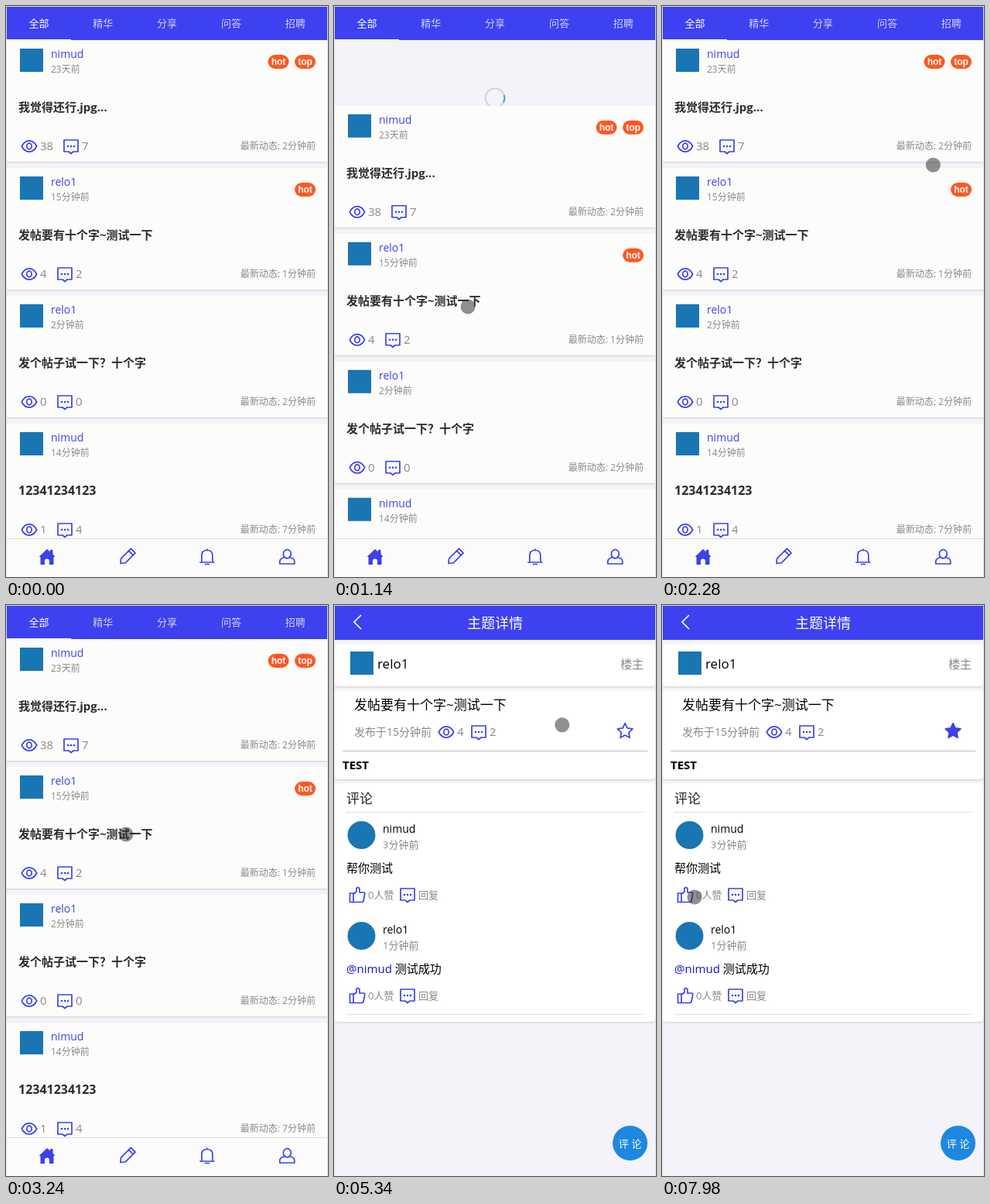
An HTML page that plays this animation: 416x737 px, repeating every 8 s.

```html
<!DOCTYPE html>
<html lang="zh">
<head>
<meta charset="utf-8">
<style>
html, body { margin: 0; width: 100%; height: 100%; overflow: hidden; background: #f4f3f9; }
svg { display: block; width: 416px; height: 737px; }
text { font-family: "Open Sans", "Noto Sans CJK SC", "Noto Sans CJK", sans-serif; white-space: pre; }
.line { fill: none; stroke: #3d41e8; stroke-width: 1.7; stroke-linejoin: round; stroke-linecap: round; }
.solid { fill: #3d41e8; }
.card { filter: drop-shadow(0 1px 1px rgba(0, 0, 0, .16)); }
</style>
</head>
<body>
<svg id="stage" viewBox="0 0 416 737"></svg>
<script>
const BLUE = '#3d41f0', INK = '#3d41e8', GREY = '#888', LOGO = '#1a75b3';
const USER_A = 'nimud', USER_B = 'relo1';

const text = (x, y, size, fill, str, extra = '') =>
  `<text x="${x}" y="${y}" font-size="${size}" fill="${fill}" ${extra}>${str}</text>`;
const rect = (x, y, w, h, fill, extra = '') =>
  `<rect x="${x}" y="${y}" width="${w}" height="${h}" fill="${fill}" ${extra}/>`;
const circle = (x, y, r, fill, extra = '') =>
  `<circle cx="${x}" cy="${y}" r="${r}" fill="${fill}" ${extra}/>`;
const path = (d, cls = 'line') => `<path class="${cls}" d="${d}"/>`;
const MID = 'text-anchor="middle"', END = 'text-anchor="end"', BOLD = 'font-weight="700"';

const STAR = Array.from({ length: 10 }, (_, i) => {
  const a = (i / 5 - 0.5) * Math.PI, r = i % 2 ? 5 : 10.3;
  return `${i ? 'L' : 'M'}${r * Math.cos(a)} ${r * Math.sin(a)}`;
}).join('') + 'Z';

const ICONS = {
  eye: path('M-9.7 0C-5-9.5 5-9.5 9.7 0C5 9.5-5 9.5-9.7 0Z') +
    '<ellipse class="line" rx="3.2" ry="3.8"/>',
  chat: path('M-9-8H9V7H3L0 9.5L-3 7H-9Z') + [-4, 0, 4].map(x => circle(x, 0, 1.3, INK)).join(''),
  thumb: path('M-9.5-2H-5V9.500H-9.5ZM-5-1L-1-4V-8.5Q1-10.5 3-8V-3H8.5Q10-3 9.7-1L8 8Q7.7 9.5 6 9.5H-5'),
  home: path('M-10.5 0L0-10L4-6.5V-9H7.5V-3.6L10.5 0H8.5V10H3V5Q3 2.500 0 2.500T-3 5V10H-8.5V0Z', 'solid'),
  pencil: '<g transform="rotate(45)">' + path('M-4-11H4V7L0 12L-4 7ZM-4-7H4') + '</g>',
  bell: path('M-9 7H9M-7 7V-2Q-7-8.5 0-8.5T7-2V7M0-8.5V-10M-2.5 9.5H2.5'),
  person: '<ellipse class="line" cy="-3.8" rx="4.9" ry="5.6"/>' +
    path('M-4 1Q-9.500 2-9.5 6V9H9.5V6Q9.5 2 4 1'),
};
const icon = (name, x, y) => `<g transform="translate(${x} ${y})">${ICONS[name]}</g>`;

const badge = (right, label) =>
  rect(right - 27, 19, 27, 18, '#ff5722', 'rx="9"') +
  text(right - 13.5, 32, 12, '#fff', label, `${MID} ${BOLD} style="font-family:'Liberation Sans',sans-serif"`);

function post(i, user, age, title, views, replies, active, badges = '', size = 15) {
  const cx = views > 9 ? 84 : 76;
  return `<g transform="translate(0 ${44 + i * 165})">` +
    rect(1, 0, 414, 157, '#fcfcfb', 'class="card"') +
    rect(18, 11, 30, 30, LOGO) +
    text(58, 23, 14, INK, user) + text(58, 42, 12, GREY, age) +
    text(16, 92, size, '#2c2c2c', title, BOLD) +
    icon('eye', 30, 137) + text(44, 142, 15, GREY, views) +
    icon('chat', cx, 137) + text(cx + 14, 142, 15, GREY, replies) +
    text(400, 141, 12, GREY, `最新动态: ${active}分钟前`, END) + badges + '</g>';
}

const posts =
  post(0, USER_A, '23天前', '我觉得还行.jpg...', 38, 7, 2, badge(365.5, 'hot') + badge(400, 'top')) +
  post(1, USER_B, '15分钟前', '发帖要有十个字~测试一下', 4, 2, 1, badge(400, 'hot')) +
  post(2, USER_B, '2分钟前', '发个帖子试一下？十个字', 0, 0, 2) +
  post(3, USER_A, '14分钟前', '12341234123', 1, 4, 7, '', 16);

const tabs = ['全部', '精华', '分享', '问答', '招聘'].map((s, i) =>
  text(42.5 + i * 82.8, 27, 13, i ? '#d3d4fb' : '#fff', s, MID)).join('');
const nav = ['home', 'pencil', 'bell', 'person'].map((n, i) => icon(n, 53 + i * 103.4, 711)).join('');

const listPage = `<g id="list">
  <g id="feed">
    ${text(208, 33, 14, GREY, '', MID + ' id="hint"')}
    <g id="spin" transform="translate(208 34)">
      ${circle(0, 0, 12.3, 'none', 'stroke="#d2d2d6" stroke-width="2"')}
      <path id="arc" d="M-12.3 0A12.3 12.3 0 0 0-8.7 8.7" fill="none" stroke="#4a9fe0" stroke-width="2"/>
    </g>
    ${posts}
  </g>
  ${rect(0, 0, 416, 44, BLUE)}${tabs}${rect(1, 43, 83, 2, '#fff')}
  ${rect(0, 687, 416, 50, '#fbfbfb')}${rect(0, 687, 416, 1, '#ddd')}${nav}
</g>`;

const panel = (y, h) => rect(1, y, 414, h, '#fff', 'rx="4" class="card"');
const rule = (x, y, fill) => rect(x, y, 416 - 2 * x, 1, fill);
const comment = (y, user, age, body) => `<g transform="translate(0 ${y})">` +
  circle(35.5, 0, 18, LOGO) +
  text(63, -3, 14, '#000', user) + text(63, 17, 13, GREY, age) +
  text(16, 48, 15, '#000', body) +
  icon('thumb', 30, 77) + text(44, 82, 13, GREY, '0人赞') +
  icon('chat', 95, 77) + text(109, 82, 13, GREY, '回复') + '</g>';

const detailPage = `<g id="detail">
  ${rect(0, 0, 416, 45, BLUE)}
  <path d="M35 13L26 22L35 31" fill="none" stroke="#fff" stroke-width="1.7"/>
  ${text(208, 30, 18, '#fff', '主题详情', MID)}
  ${panel(51, 54)}${rect(21, 60, 30, 30, LOGO)}
  ${text(56, 82, 17, '#000', USER_B)}${text(400, 82, 15, GREY, '楼主', END)}
  ${panel(110, 115)}
  ${text(26, 135, 17, '#000', '发帖要有十个字~测试一下')}
  ${text(26, 169, 14, GREY, '发布于15分钟前')}
  ${icon('eye', 145, 164)}${text(159, 169, 15, GREY, 4)}
  ${icon('chat', 187, 164)}${text(201, 169, 15, GREY, 2)}
  <path id="star" class="line" d="${STAR}" transform="translate(376 163)"/>
  ${rule(11, 188, '#bbb')}${text(11, 212, 15, '#000', 'TEST', BOLD)}
  ${panel(230, 308)}${text(16, 256, 17, '#222', '评论')}
  ${rule(16, 267, '#ddd')}
  ${comment(297, USER_A, '3分钟前', '帮你测试')}
  ${comment(427, USER_B, '1分钟前', `<tspan fill="#1414c4">@${USER_A}</tspan> 测试成功`)}
  ${rule(16, 528, '#ddd')}
  ${circle(382.5, 694.5, 22.5, '#1e88e0')}${text(382.5, 700, 13, '#fff', '评 论', MID)}
  <g id="toast">
    ${rect(163, 320, 90, 98, 'rgba(0,0,0,.69)', 'rx="4"')}
    ${circle(208, 353, 17.5, 'none', 'stroke="#fff"')}
    <path d="M199 353L206 359L217 347" fill="none" stroke="#fff" stroke-width="1.2"/>
    ${text(208, 398, 14, '#fff', '收藏成功', MID)}
  </g>
</g>`;

const $ = id => document.getElementById(id);
$('stage').innerHTML = rect(0, 0, 416, 737, '#f4f3f9') + listPage + detailPage +
  circle(0, 0, 9.5, 'rgba(45,45,45,.53)', 'id="cursor"') +
  '<path d="M.5 737V.5H415.5V737" fill="none" stroke="#dcdce4"/>';

const clamp = v => Math.min(1, Math.max(0, v));
const easeOut = p => 1 - (1 - clamp(p)) ** 1.5;
const show = (id, on) => $(id).style.display = on ? '' : 'none';

// Cursor trips: start, end, and the way from where the last one stopped
let stop = { x: 180, y: 36 };
const trips = [
  [240, 720, 'V153'],
  [720, 1020, 'L173 388'],
  [1200, 1560, 'L373 209'],
  [1920, 2340, 'L349 205'],
  [2520, 3240, 'L265 244H235L155 296'],
  [3780, 4200, 'L229 219L254 178'],
  [4200, 4380, 'Q252 160 178 161'],
  [4440, 5220, 'H120L90 214L178 161'],
  [5220, 5520, 'Q290 148 396 162'],
  [5640, 5760, 'H376'],
  [5940, 6420, 'L402 127L388 104H344L324 118'],
  [6480, 6780, 'L142 318L58 370'],
  [6840, 7200, 'L29 373'],
  [7440, 7620, 'L142 319'],
  [7740, 7980, 'L42 377'],
].map(([from, to, way]) => {
  const track = document.createElementNS('http://www.w3.org/2000/svg', 'path');
  track.setAttribute('d', `M${stop.x} ${stop.y}${way}`);
  const length = track.getTotalLength();
  stop = track.getPointAtLength(length);
  return { from, to, track, length };
});

function cursorAt(t) {
  const { from, to, track, length } = trips.findLast(trip => trip.from <= t) || trips[0];
  return track.getPointAtLength(length * easeOut((t - from) / (to - from)));
}

// The feed follows the finger at half speed, rests while loading, then closes
const GRAB = 153, RELEASE = 1080, LOADED = 1980, REST = 25, PULL = 117;
function feedOffset(t, y) {
  if (t < RELEASE) return Math.max(0, (y - GRAB) / 2);
  if (t < LOADED) return PULL + (REST - PULL) * easeOut((t - RELEASE) / 240);
  return REST * (1 - easeOut((t - LOADED) / 240));
}

function draw(t) {
  const inList = t < 3600;
  show('list', inList);
  show('detail', !inList);

  const { x, y } = cursorAt(t);
  show('cursor', t >= 240);
  $('cursor').setAttribute('transform', `translate(${x} ${y})`);

  const offset = feedOffset(t, y);
  $('feed').setAttribute('transform', `translate(0 ${offset})`);
  $('hint').textContent = t >= RELEASE || !offset ? '' : offset < 50 ? '下拉即可刷新' : '松开立即刷新';
  show('spin', t >= RELEASE && offset > 0);
  $('arc').setAttribute('transform', `rotate(${20 + (t - 1620) * 0.36})`);

  $('star').style.fill = t >= 5760 ? INK : 'none';
  $('toast').style.opacity = clamp((t - 5940) / 180) * clamp((7200 - t) / 180);
}

const start = performance.now();
function tick(now) {
  const t = Math.max(0, now - start) % 8000;
  draw(Math.floor(t / 60) * 60);
  requestAnimationFrame(tick);
}
draw(0);
requestAnimationFrame(tick);
</script>
</body>
</html>
```
